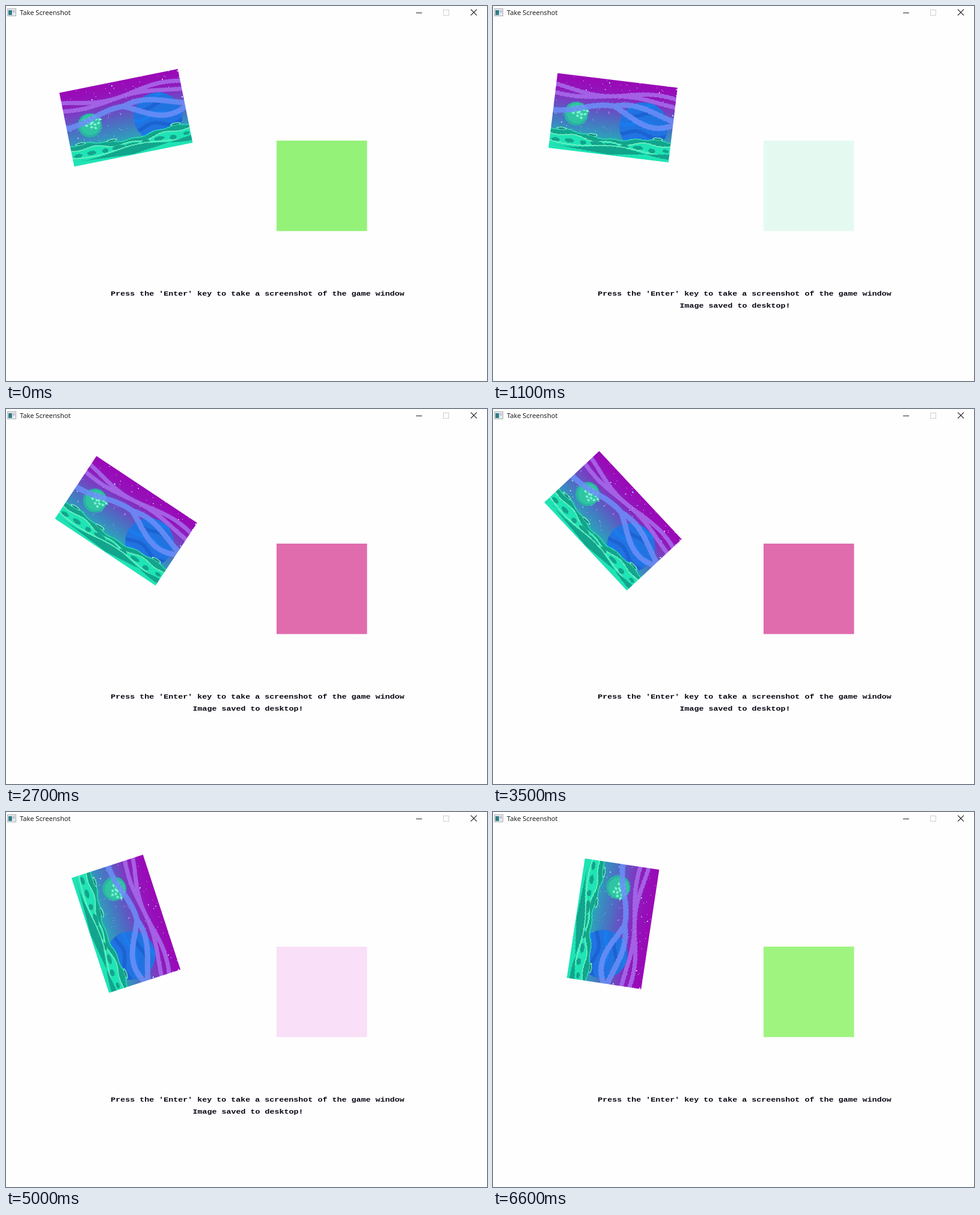
An HTML page with a canvas that plays this animation: 800x624 px, repeating every 6.7 s.

```html
<!DOCTYPE html>
<html lang="en">
<head>
<meta charset="utf-8">
<title>Take Screenshot</title>
<style>
  html, body { margin: 0; width: 100%; height: 100%; overflow: hidden; background: #fefefe; }
  canvas, svg { position: absolute; left: 0; top: 0; }
  .mono { font: bold 13.36px "Liberation Mono", "DejaVu Sans Mono", monospace; fill: #060410; }
  .title { font: 11.2px "Open Sans", "Noto Sans", sans-serif; fill: #111; }
</style>
</head>
<body>
<canvas id="stage" width="800" height="624"></canvas>
<svg width="800" height="624" viewBox="0 0 800 624">
  <g>
    <rect x="2.5" y="4.5" width="14" height="12" fill="#e8eaee" stroke="#a9adb3"/>
    <rect x="4" y="7" width="6" height="8" fill="#2f7f86"/>
    <rect x="11" y="7" width="4" height="4" fill="#c9c2d6"/>
  </g>
  <text class="title" x="23" y="14.7">Take Screenshot</text>
  <path d="M682 11.5H692" stroke="#222"/>
  <rect x="727.5" y="6.5" width="9" height="9" fill="none" stroke="#cfcfcf"/>
  <path d="M773 5.7L783 15.7M783 5.7L773 15.7" stroke="#222" stroke-width="1.2"/>
  <text class="mono" transform="translate(174.2 482) scale(1 .8)">Press the 'Enter' key to take a screenshot of the game window</text>
  <text class="mono" id="saved" transform="translate(310.5 502) scale(1 .8)">Image saved to desktop!</text>
</svg>
<script>
const LOOP = 6700, STEP = 100;
const W = 201, H = 125;
const { sin, cos, abs, max, sqrt, floor, PI } = Math;
const ctx = document.getElementById('stage').getContext('2d');
const saved = document.getElementById('saved');
const fills = ['#94f279', '#e4faf1', '#e06cae', '#f9dff7', '#9ff480'];

function makeRandom(seed) {
  return () => (seed = (seed * 16807) % 2147483647) / 2147483647;
}

// Adds the curve y = f(x) across the picture
function trace(g, f) {
  g.moveTo(-2, f(-2));
  for (let x = 0; x <= W + 2; x += 2) g.lineTo(x, f(x));
}

function ribbon(g, width, color, ...curves) {
  g.beginPath();
  curves.forEach(f => trace(g, f));
  g.lineWidth = width;
  g.strokeStyle = color;
  g.stroke();
}

function disc(g, x, y, rx, ry, color) {
  g.beginPath();
  g.ellipse(x, y, rx, ry, 0, 0, 2 * PI);
  g.fillStyle = color;
  g.fill();
}

function land(g, color, f) {
  g.beginPath();
  trace(g, f);
  g.lineTo(W + 2, H);
  g.lineTo(-2, H);
  g.fillStyle = color;
  g.fill();
}

function drawSky(g, rand) {
  const sky = g.createLinearGradient(0, 0, 0, 100);
  ['#9a08b6', '#9412ba', '#7a3cc2', '#5860c2', '#3e82c2', '#2ba6b8']
    .forEach((c, i, all) => sky.addColorStop(i / (all.length - 1), c));
  g.fillStyle = sky;
  g.fillRect(0, 0, W, H);
  const tints = ['#e0b0f6', '#9cd0f8', '#c4f0f8', '#cc80ea'];
  for (let i = 0; i < 110; i++) {
    g.fillStyle = tints[i % 4];
    const size = i % 11 ? 1 : 2;
    g.fillRect(floor(rand() * W), floor(rand() * 92), size, size);
  }
}

function drawPlanets(g) {
  g.save();
  g.beginPath();
  g.arc(153, 71, 40.5, 0, 2 * PI);
  g.clip();
  g.fillStyle = '#2173e2';
  g.fillRect(0, 0, W, H);
  for (let i = 0; i < 5; i++) {
    ribbon(g, 6, i % 2 ? '#1b63d2' : '#1a7cec', x => 36 + i * 16 + 4 * sin(x / 10 + i));
  }
  g.restore();

  disc(g, 39, 63, 20, 20, '#2ab2a4');
  disc(g, 40, 62, 17, 17, '#30c5a2');
  for (let i = 0; i < 14; i++) {
    const a = i * 2.4, r = 3.7 * sqrt(i);
    disc(g, 44 + r * cos(a), 59 + r * sin(a) * .85, 2.4, 2, '#80f4d4');
  }
}

// Two strands that part and meet around a common middle line
function drawCloud(g, color, width, middle, gap) {
  ribbon(g, width, color, x => middle(x) - gap(x), x => middle(x) + gap(x));
}

function drawClouds(g) {
  drawCloud(g, 'rgba(168,108,236,.86)', 7,
    x => 26 + 4 * sin(x / 30 - .3),
    x => 7 * cos(PI * x / 190) ** 2);
  drawCloud(g, 'rgba(108,142,248,.86)', 9,
    x => 52 + 9 * cos(x / 30),
    x => max(0, 13 * sin((x - 100) * PI / 110)));
}

function drawGround(g, rand) {
  const bright = '#1fe4b5', dark = '#12a48c', glow = '#7cf3c4';
  const horizon = x => 95 - 4 * cos((x - 18) / 25.6) + 1.2 * sin(x / 6);
  const ridge = x => 102 - 3 * cos((x - 18) / 25.6) + 2 * sin(x / 9);
  land(g, dark, horizon);
  ribbon(g, 1.5, '#2fe0b4', horizon);
  land(g, bright, ridge);
  ribbon(g, 1.5, glow, ridge);

  for (let i = 0; i < 9; i++) {
    const x = 10 + i * 23, y = 106 + rand() * 5, r = 5 + rand() * 7;
    disc(g, x, y, r, 2 + rand() * 2, dark);
  }
  // Shaded valley, fading out towards both bottom corners
  ribbon(g, 1.5, glow, x => 112 + 3 * sin(x / 24));
  g.beginPath();
  trace(g, x => 118 - 5 * sin(PI * x / W) + 3 * sin(x / 24));
  g.lineTo(W, 112);
  g.lineTo(W / 2, 124);
  g.fillStyle = dark;
  g.fill();

  // Craters
  [18, 70, 179].forEach(x => {
    const y = horizon(x) - 1;
    disc(g, x, y, 9, 2.5, glow);
    disc(g, x, y + .3, 7, 1.5, '#108985');
  });
}

function makePicture() {
  const c = document.createElement('canvas');
  c.width = W;
  c.height = H;
  const g = c.getContext('2d');
  const rand = makeRandom(904127);
  g.lineJoin = 'round';
  drawSky(g, rand);
  drawPlanets(g);
  drawClouds(g);
  drawGround(g, rand);
  return c;
}

const picture = makePicture();
const start = performance.now();

function draw() {
  const t = floor(((performance.now() - start) % LOOP) / STEP) * STEP;
  ctx.fillStyle = '#fefefe';
  ctx.fillRect(0, 0, 800, 624);

  // A new colour every two seconds
  ctx.fillStyle = fills[floor((t + 1800) / 2000)];
  ctx.fillRect(450, 224, 150.5, 150.5);

  ctx.save();
  ctx.translate(199.6, 186);
  ctx.rotate((t / 60 - 11.4) * PI / 180);
  ctx.imageSmoothingEnabled = false;
  ctx.drawImage(picture, -W / 2, -H / 2);
  ctx.restore();

  saved.style.visibility = t >= 400 && t < 6100 ? 'visible' : 'hidden';
  requestAnimationFrame(draw);
}
draw();
</script>
</body>
</html>
```
